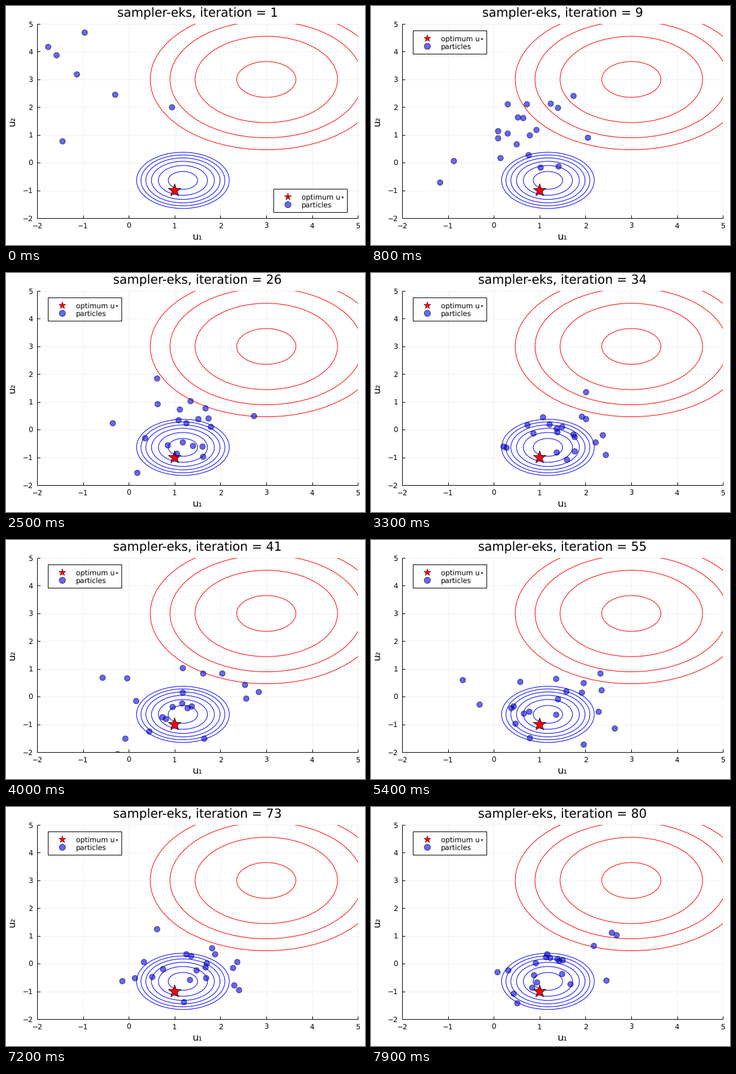
A matplotlib script for the animation above (8 s loop, 600 by 400 pixels).

```python
import numpy as np
import matplotlib.pyplot as plt
from matplotlib.animation import FuncAnimation
from matplotlib.patches import Circle, Ellipse, Polygon, Rectangle

W, H, DPI = 600, 400, 100
PT = 72 / DPI
FRAMES, COUNT = 80, 20
LEGEND_MOVE = 3
TITLE, GUIDE, SMALL = 20.7, 16.3, 11.85

plt.rcParams["font.family"] = "DejaVu Sans"
plt.rcParams["text.hinting"] = "none"
fig = plt.figure(figsize=(W / DPI, H / DPI), dpi=DPI, facecolor="white")
ax = fig.add_axes([0, 0, 1, 1])
ax.set(xlim=(0, W), ylim=(H, 0))
ax.axis("off")

LEFT, RIGHT, TOP, BOTTOM = 52.2, 588.2, 30.0, 355.2
UX, UY = (RIGHT - LEFT) / 7, (BOTTOM - TOP) / 7


def X(u):
    return LEFT + (u + 2) * UX


def Y(u):
    return BOTTOM - (u + 2) * UY


def line(xs, ys, color="black", z=5):
    ax.plot(xs, ys, color=color, lw=PT, zorder=z, solid_capstyle="butt")


def text(x, y, s, px, **kw):
    return ax.text(x, y, s, fontsize=px * PT, va="baseline", **kw)


def star(x, y, r, width, z):
    a = -np.pi / 2 + np.arange(10) * np.pi / 5
    rad = np.where(np.arange(10) % 2, 0.4 * r, r)
    pts = np.column_stack([x + rad * np.cos(a), y + rad * np.sin(a)])
    return ax.add_patch(Polygon(pts, fc="red", ec="black", lw=width * PT,
                                joinstyle="round", zorder=z))


BLUE, EDGE = (0, 0, 1, 0.6), (0, 0, 0, 0.6)
area = Rectangle((LEFT, TOP), RIGHT - LEFT, BOTTOM - TOP, transform=ax.transData)

# Axes, ticks and grid
for v in range(-2, 6):
    label = str(v).replace("-", "\u2212")
    line([X(v)] * 2, [TOP, BOTTOM], "#f0f0f0", 1)
    line([LEFT, RIGHT], [Y(v)] * 2, "#f0f0f0", 1)
    line([X(v)] * 2, [BOTTOM, BOTTOM - 5])
    line([LEFT, LEFT + 5], [Y(v)] * 2)
    text(X(v), 371.5, label, SMALL, ha="center")
    text(45, Y(v) + 4.6, label, SMALL, ha="right")
line([LEFT, LEFT], [TOP, BOTTOM])
line([LEFT, RIGHT], [BOTTOM, BOTTOM])
text(320.2, 391.5, "u\u2081", GUIDE, ha="center")
text(15, 192.6, "u\u2082", GUIDE, ha="center", rotation=90, rotation_mode="anchor")
title = text(320.2, 18.4, "", TITLE, ha="center")


# Level sets of the two quadratic potentials
def contours(cx, cy, r2, step, n, color):
    for k in range(n):
        d = 2 * np.sqrt(r2 + step * k)
        e = Ellipse((X(cx), Y(cy)), d * UX, d * UY, fill=False, ec=color, lw=PT, zorder=2)
        ax.add_patch(e)
        e.set_clip_path(area)


contours(3, 3, 0.417, 2, 4, "red")
contours(1.18, -0.636, 0.103, 0.184, 6, "blue")
star(X(1), Y(-1), 11, 0.8, 3)


def legend(x, y):
    return [
        ax.add_patch(Rectangle((x, y), 123.4, 39, fc="white", ec="black", lw=PT, zorder=7)),
        star(x + 24.2, y + 13.4, 6.3, 0.4, 8),
        ax.add_patch(Circle((x + 24.2, y + 26.5), 5.2, fc=BLUE, ec=EDGE, lw=PT, zorder=8)),
        text(x + 47.2, y + 17.7, "optimum u\u22c6", SMALL, zorder=8),
        text(x + 47.2, y + 30.8, "particles", SMALL, zorder=8),
    ]


early, late = legend(447, 306), legend(70, 41)

# Ensemble: a few particles start in view, the rest above it; then all
# drift towards the mean and diffuse until the spread is stationary
rng = np.random.default_rng(5)
MEAN, SPREAD, KEEP = np.array([1.15, -0.2]), np.array([0.9, 0.7]), 0.83
seen = np.array([(-1.77, 4.19), (-1.59, 3.88), (-0.97, 4.69), (-1.14, 3.2),
                 (-0.3, 2.47), (0.94, 2.0), (-1.46, 0.78)])
hidden = rng.normal(size=(COUNT - len(seen), 2))
hidden = np.column_stack([hidden[:, 0] - 0.5, 5.3 + abs(hidden[:, 1])])

path = [np.vstack([seen, hidden])]
for _ in range(FRAMES - 1):
    kick = rng.normal(size=(COUNT, 2)) * SPREAD * np.sqrt(1 - KEEP ** 2)
    path.append(MEAN + (path[-1] - MEAN) * KEEP + kick)
path = np.array(path)
path = np.stack([X(path[..., 0]), Y(path[..., 1])], axis=-1)

dots = ax.scatter(*path[0].T, s=(9.3 * PT) ** 2, fc=[BLUE], ec=[EDGE], lw=PT, zorder=4)
dots.set_clip_path(area)


def update(i):
    title.set_text(f"sampler-eks, iteration = {i + 1}")
    dots.set_offsets(path[i])
    for a in early:
        a.set_visible(i < LEGEND_MOVE)
    for a in late:
        a.set_visible(i >= LEGEND_MOVE)
    return [title, dots, *early, *late]


anim = FuncAnimation(fig, update, frames=FRAMES, interval=100, repeat=True, repeat_delay=0)
plt.show()
```
